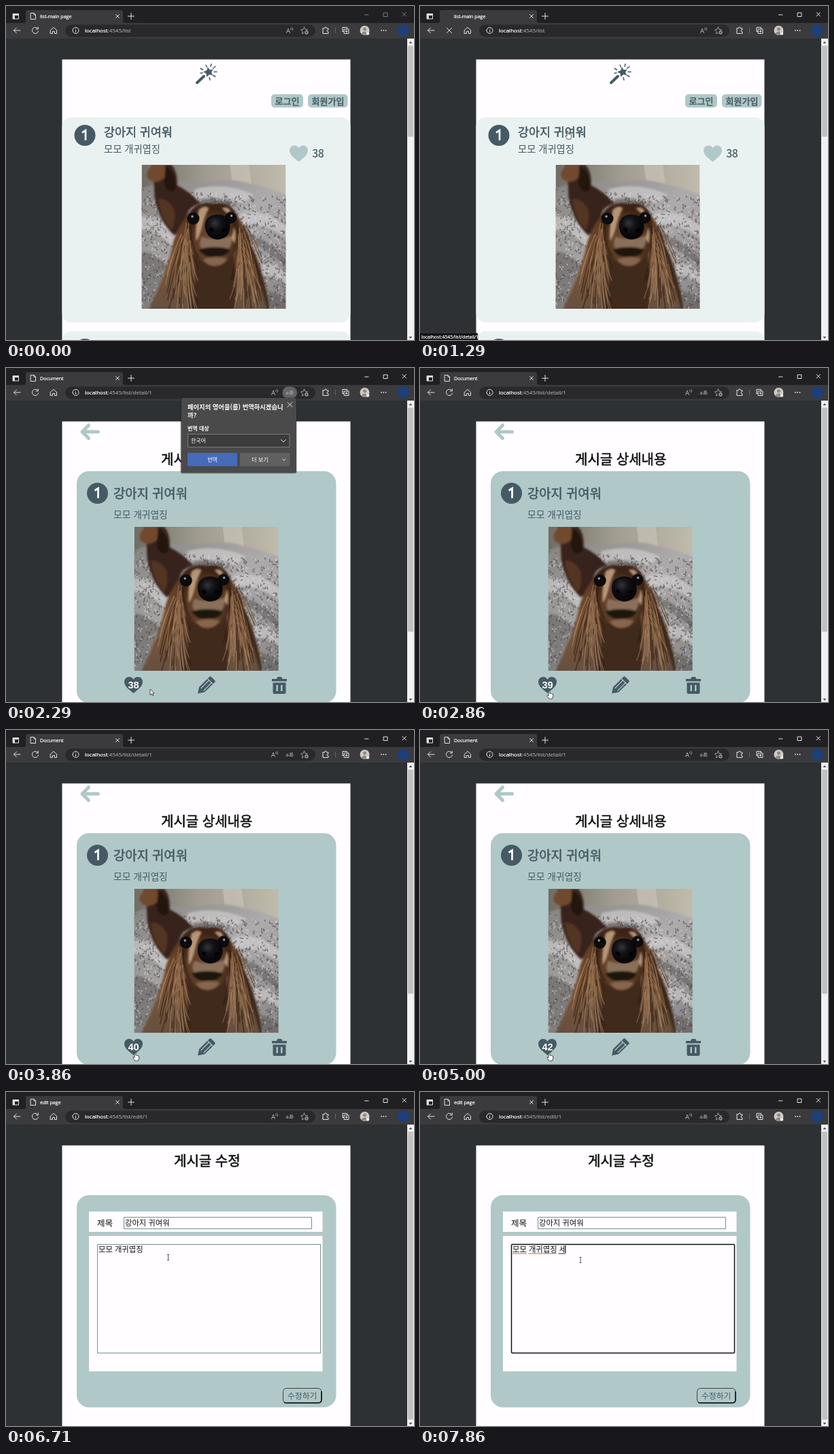
Animation, 600 px wide and 492 px high, one loop 8 s. Source, as an HTML page:

```html
<!DOCTYPE html>
<html lang="ko">
<head>
<meta charset="utf-8">
<title>List demo</title>
<style>
html, body { margin: 0; width: 100%; height: 100%; overflow: hidden; background: #2d3133; }
svg { display: block; }
.stage { width: 600px; height: 492px; }
text { font-family: "Noto Sans CJK KR", "Noto Sans CJK", "Noto Sans CJK JP", sans-serif; white-space: pre; }
.ui { font-family: "Open Sans", "Noto Sans", sans-serif; fill: #fff; stroke: #fff; stroke-width: .22; }
.dim { fill: #b0b0b0; stroke: #b0b0b0; stroke-width: .1; }
.mid { font-weight: 500; stroke: currentColor; stroke-width: .55; }
.num { font-family: "Liberation Sans", sans-serif; font-weight: 700; }
.ink { color: #111; fill: #111; }
.slate { color: #455a64; fill: #455a64; }
.teal { fill: #b0c8c7; }
.white { fill: #fffdff; }
.line { fill: none; stroke: #e4e4e4; stroke-width: 1; stroke-linecap: round; stroke-linejoin: round; }
.soft { stroke: #a0a0a0; }
.c { text-anchor: middle; }
</style>
</head>
<body>
<svg class="stage" viewBox="0 0 600 492">
  <defs>
    <linearGradient id="wall" x2="1"><stop stop-color="#6f6c64"/><stop offset=".45" stop-color="#a09c90"/><stop offset="1" stop-color="#c0bbac"/></linearGradient>
    <linearGradient id="cloth" x2="1" y2="1"><stop stop-color="#84817e"/><stop offset=".5" stop-color="#aeabac"/><stop offset="1" stop-color="#858283"/></linearGradient>
    <linearGradient id="ear" x2="0" y2="1"><stop stop-color="#54331c"/><stop offset=".5" stop-color="#7a5335"/><stop offset="1" stop-color="#665040"/></linearGradient>
    <radialGradient id="face" cy=".6"><stop stop-color="#6b4930"/><stop offset=".6" stop-color="#62402a"/><stop offset="1" stop-color="#3c2415"/></radialGradient>
    <radialGradient id="nose" cx=".4" cy=".35"><stop stop-color="#35343a"/><stop offset=".5" stop-color="#131216"/><stop offset="1" stop-color="#08070a"/></radialGradient>
    <filter id="blur"><feGaussianBlur stdDeviation="1.5"/></filter>
    <clipPath id="square"><path d="M0 0H212V212H0Z"/></clipPath>
    <path id="heart" d="M13.500 24C9 20 0 14.500 0 7.500C0 3 3.200 0 7 0C10 0 12.300 1.500 13.500 4C14.700 1.500 17 0 20 0C23.800 0 27 3 27 7.500C27 14.500 18 20 13.500 24Z"/>

    <g id="photo" clip-path="url(#square)">
      <path fill="url(#wall)" d="M0 0H212V70H0Z"/>
      <path fill="#cbc7ba" opacity=".6" d="M130 0H158L162 34H134Z"/>
      <g filter="url(#blur)">
        <path fill="url(#cloth)" d="M-4 36Q40 18 90 27Q130 18 160 28Q190 34 216 46V216H-4Z"/>
        <path fill="#d6d3d4" opacity=".6" d="M78 36Q120 24 165 44L150 56Q110 42 78 52ZM145 72Q180 62 214 92V108Q180 84 148 88ZM-2 76Q28 74 54 106L44 120Q22 94-2 96ZM170 150Q190 140 214 160V176Q190 158 172 166Z"/>
        <path fill="#5d5a58" opacity=".55" d="M-4 128Q20 126 38 150L14 216H-4ZM150 100Q180 104 214 140V152Q180 120 154 112ZM168 178L214 196V216H184ZM72 56Q100 44 140 56L138 62H74Z"/>
      </g>
      <path id="specks" fill="none" stroke="#454143" stroke-linecap="round" stroke-width="1.700" opacity=".55"/>
      <path id="flecks" fill="none" stroke="#e2dfe0" stroke-linecap="round" stroke-width="1.700" opacity=".5"/>
      <g filter="url(#blur)">
        <path fill="#39231a" d="M14 0H44Q53 10 52 30Q72 40 86 57Q70 60 66 76Q60 94 48 104Q26 84 19 48L18 26Z"/>
        <path fill="#71492f" d="M8 12Q12-2 28-1Q40 2 36 16Q28 26 18 25Q6 22 8 12Z"/>
        <path fill="#22140e" d="M35 2Q52 12 50 36Q40 46 33 28Z"/>
        <path fill="#5b3a26" opacity=".8" d="M24 50Q38 48 48 66Q50 84 44 96Q28 78 24 50Z"/>
        <path fill="#3f2a1d" d="M65 95Q38 150 42 214H188Q180 145 146 92Z"/>
        <path fill="url(#ear)" d="M74 66Q56 86 47 112Q40 150 10 214H72Q83 175 75 130Q70 95 78 72Z"/>
        <path fill="url(#ear)" d="M132 64Q149 84 160 112Q164 146 185 214H136Q142 180 136 135Q136 100 128 76Z"/>
        <path fill="url(#face)" d="M68 74Q78 54 105 57Q132 52 141 76Q144 98 140 122Q132 146 108 150Q84 146 75 124Q66 98 68 74Z"/>
      </g>
      <path id="shade" fill="none" stroke="#2a180f" stroke-width="1.800" opacity=".5"/>
      <path id="fur" fill="none" stroke="#c09a75" stroke-width="1.200" opacity=".5"/>
      <g filter="url(#blur)">
        <path fill="#c9a986" opacity=".85" d="M84 66Q93 58 99 64Q92 76 88 94Q84 108 80 112Q78 94 84 66ZM118 64Q126 60 131 68L126 72ZM136 92Q140 100 137 116L132 108Z"/>
        <path fill="#8a6f5a" d="M88 106Q110 114 133 104Q134 122 123 127Q108 132 92 128Q82 120 88 106Z"/>
        <path fill="#1f130e" d="M84 124Q108 118 130 124Q126 136 108 135Q92 138 84 124Z"/>
        <path fill="#94745a" opacity=".75" d="M90 139Q108 134 126 138Q120 149 108 149Q96 149 90 139Z"/>
      </g>
      <g fill="#0d0b0c"><circle cx="76" cy="79" r="9"/><circle cx="131" cy="78" r="8.500"/></g>
      <g fill="#8fa3b5"><circle cx="74.500" cy="76" r="1.700"/><circle cx="132" cy="75" r="1.700"/></g>
      <path fill="url(#nose)" d="M93 90Q94 73 112 73Q130 74 130 92Q129 109 111 110Q94 108 93 90Z"/>
      <path fill="#000" d="M99 94q5-4 7 3q-4 5-7-3ZM117 97q4-7 8-2q-2 6-8 2Z"/>
    </g>

    <g id="badge"><circle r="15.500" class="slate"/><path d="M-4-4L1-7.200V7.200" fill="none" stroke="#fff" stroke-width="2.700"/></g>
  </defs>

  <rect width="600" height="492" fill="#2d3133"/>
  <rect class="white" x="82.500" y="78.700" width="424" height="414"/>

  <g id="list">
    <g stroke="#455a64" stroke-linecap="round">
      <path d="M281 113L291 103.500" stroke-width="4"/>
      <path d="M294 87L295.500 90M302 85.500L301 89M308 89L304.500 92M310 97H306M308 104L304.500 102M300 109L299 105.500M286 92L289.500 94M286 99L289 98.500" stroke-width="1.500"/>
    </g>
    <path class="slate" d="M297 90L299.500 94L304.500 93.500L302 97.500L304 102L299 101L295 104.500L294.500 99.500L290 97L295 95Z"/>
    <rect class="teal" x="390" y="130" width="47" height="19.500" rx="5"/>
    <rect class="teal" x="444" y="130" width="58.500" height="19.500" rx="5"/>
    <g class="c mid slate" font-size="13"><text x="413.500" y="144.500">로그인</text><text x="473.500" y="144.500">회원가입</text></g>
    <rect x="82.500" y="164" width="424" height="302" rx="14" fill="#e9f2f1"/>
    <rect x="82.500" y="479" width="424" height="302" rx="14" fill="#e9f2f1"/>
    <use href="#badge" x="116" y="190.500"/>
    <use href="#badge" x="116" y="505.500"/>
    <g class="mid slate" font-size="17.400"><text x="144" y="192">강아지 귀여워</text><text x="144" y="507">우리집 강아지</text></g>
    <text x="144" y="216" font-size="14.300" class="slate">모모 개귀엽징</text>
    <use href="#heart" x="417" y="205.500" class="teal"/>
    <text x="450.500" y="222.500" font-size="15.500" class="slate" stroke="#455a64" stroke-width=".3">38</text>
    <use href="#photo" x="199.500" y="234"/>
  </g>

  <g id="detail">
    <path d="M135.500 94H113M121.500 84.500L112 94L121.500 103.500" fill="none" stroke="#b0c8c7" stroke-width="5" stroke-linecap="round" stroke-linejoin="round"/>
    <text class="mid ink" x="228" y="142" font-size="20">게시글 상세내용</text>
    <rect class="teal" x="104" y="152" width="381.500" height="341.500" rx="18"/>
    <use href="#badge" x="134.500" y="184.500"/>
    <text class="mid slate" x="158" y="191.500" font-size="18.800">강아지 귀여워</text>
    <text class="slate" x="158" y="220.500" font-size="13.750">모모 개귀엽징</text>
    <use href="#photo" x="188.700" y="234"/>
    <use href="#heart" x="174" y="455" class="slate"/>
    <text id="likes" class="c num" x="187.500" y="472" font-size="14.500" fill="#fff"></text>
    <g class="slate">
      <path d="M282 479.500L284 470L299 455Q300.500 453.500 302 455L307 460Q308.500 461.500 307 463L292 477.500Z"/>
      <path d="M391 458H398L399.500 455H405L406.500 458H413V461.500H391Z"/>
      <path d="M392.500 463.500H411.500V477.500Q411.500 480 409 480H395Q392.500 480 392.500 477.500Z"/>
    </g>
    <path d="M296.500 458L304 465.500M286.500 472L299 459.500M290.500 475.500L303 463" stroke="#b0c8c7" stroke-width="1.100"/>
    <path d="M398.700 467V476M405.300 467V476" stroke="#b0c8c7" stroke-width="2.400"/>
  </g>

  <g id="edit">
    <text class="mid ink" x="247" y="109" font-size="20">게시글 수정</text>
    <rect class="teal" x="104" y="152" width="381.500" height="312.500" rx="18"/>
    <path class="white" d="M122 176H465.500V206H122ZM122 212H465.500V411.500H122Z"/>
    <text class="ink" x="134" y="197.500" font-size="12.500">제목</text>
    <path fill="none" stroke="#78908f" d="M173.500 184.500H449.500V201.500H173.500Z"/>
    <rect id="area" x="134.500" y="224.500" width="328" height="160" fill="none"/>
    <g class="ink" font-size="11.300"><text x="175" y="197">강아지 귀여워</text><text id="body" x="136" y="236"></text></g>
    <path id="marks" d="M136 238H157M159.500 238H201" stroke="#b56a3a"/>
    <path id="compose" d="M203.500 238H213.500" stroke="#222"/>
    <path id="caret" stroke="#111"/>
    <rect x="407.500" y="436.500" width="56.500" height="21.500" rx="5" class="teal" stroke="#3c4244"/>
    <path d="M409 457.200Q410 458 412 458H459Q464 458 464 453V441" fill="none" stroke="#111" stroke-width="1.600"/>
    <text class="c slate" x="435.700" y="451.500" font-size="11.800">수정하기</text>
  </g>

  <g id="browser">
    <path fill="#202022" d="M0 0H600V26H0Z"/>
    <path fill="#3b3a3c" d="M0 25H600V48H0ZM26 25Q29 25 29 22V9Q29 6 32 6H169Q172 6 172 9V22Q172 25 175 25Z"/>
    <rect x="87" y="27.500" width="368" height="18" rx="9" fill="#29292b"/>
    <path class="line" d="M10.500 11.500H18.500V19H10.500ZM161.500 12.500L166.500 17.500M166.500 12.500L161.500 17.500M184 10.500V19.500M179.500 15H188.500"/>
    <path fill="#dedede" d="M10 11H19V14H10ZM10 11H13V19H10Z"/>
    <path id="doc" class="line" d="M36.500 10.500H41L43.500 13V19.500H36.500ZM41 10.500V13H43.500"/>
    <path id="buttons" class="line" d="M527.500 13H533M555.500 10H561V15.500H555.500ZM583 9.500L588.500 15M588.500 9.500L583 15"/>
    <text id="tab" class="ui" x="50" y="17.700" font-size="7.100"></text>
    <path class="line" d="M21 36H11.500M15.500 32L11.500 36L15.500 40"/>
    <path id="reload" class="line" d="M47 33.500A4.600 4.600 0 1 0 47.600 37M47.300 31V34H44.300"/>
    <path id="stop" class="line" d="M39.500 32.500L46.500 39.500M46.500 32.500L39.500 39.500"/>
    <path class="line" d="M65.500 35.500L70 31.500L74.500 35.500V40.500H71.500V37.500H68.500V40.500H65.500Z"/>
    <path class="line" d="M98 36a4.500 4.500 0 1 0 9 0a4.500 4.500 0 1 0-9 0M102.500 35.800V38.500M102.500 33.700V33.800"/>
    <text class="ui" x="116" y="39" font-size="8">localhost<tspan id="url" class="dim"></tspan></text>
    <g id="read"><text class="ui dim" x="-5" y="39.500" font-size="9.500">A</text><path class="line soft" stroke-width=".8" d="M1.500 32.500Q3 33.500 2 35M3.500 31.500Q6 33.500 4 36"/></g>
    <rect id="hot" x="406.500" y="27.500" width="21.500" height="17.500" rx="8.500" fill="#646466"/>
    <text id="lang" class="ui dim" x="411.500" y="38.800" font-size="7.500">aあ</text>
    <path class="line soft" d="M438.500 31L440 34.500L443.500 35L441 37M438.500 31L437 34.500L433.500 35L436 37.500L435.500 41L438 39.500"/>
    <circle cx="442" cy="39" r="2.700" fill="#a0a0a0"/><path d="M442 37.500V40.500M440.500 39H443.500" stroke="#29292b" stroke-width=".8"/>
    <path class="line" d="M466 33H468.500Q468.500 31 470 31Q471.500 31 471.500 33H474V35Q472 35 472 36.500Q472 38 474 38V40.500H466V38M466 33V38"/>
    <path d="M484.500 32V40" stroke="#666"/>
    <path class="line" d="M495 37.500V31.500H501.500V33.500M495 37.500H497M497.500 34H504V40.500H497.500ZM500.700 35.800V38.800M499.200 37.300H502.200"/>
    <circle cx="527.500" cy="36" r="7" fill="#cfcac5"/>
    <circle cx="527.500" cy="34" r="2.500" fill="#8e8985"/><path d="M522.500 40.500Q527.500 34.500 532.500 40.500Q527.500 45 522.500 40.500Z" fill="#8e8985"/>
    <circle cx="532" cy="40.500" r="2.300" fill="#eee"/>
    <g fill="#dedede"><circle cx="552" cy="36" r=".9"/><circle cx="555.300" cy="36" r=".9"/><circle cx="558.600" cy="36" r=".9"/></g>
    <circle cx="584" cy="36" r="9" fill="#1f3f78"/>
    <path fill="#f1f1f1" d="M590 48H600V492H590Z"/>
    <rect id="thumb" x="591" y="58.500" width="8" fill="#c1c1c1"/>
    <path fill="#555" d="M592.500 55L595 52L597.500 55ZM592.500 487L595 490L597.500 487Z"/>
  </g>

  <g id="popup">
    <rect x="256.500" y="43.500" width="171" height="112" rx="3" fill="#000" opacity=".35"/>
    <rect x="257.500" y="44" width="169.500" height="110.500" rx="2.500" fill="#4a4a4b"/>
    <g fill="#fff" font-size="8">
      <g font-weight="700"><text x="267" y="60.500" font-size="9.300">페이지의 영어을(를) 번역하시겠습니</text><text x="267" y="72.500" font-size="9.300">까?</text><text x="267" y="91.500">번역 대상</text></g>
      <path fill="#3c3c3d" stroke="#7b7b7b" d="M267.500 97.500H417V116.500H267.500Z"/>
      <path fill="#456bb9" d="M267 125H340V144.500H267Z"/>
      <path fill="#606061" d="M344 125H417.500V144.500H344Z"/>
      <text x="272" y="109.700">한국어</text><text class="c" x="303.500" y="137.500">번역</text><text class="c" x="373.500" y="137.500">더 보기</text>
    </g>
    <path class="line" d="M414 50.500L421 57.500M421 50.500L414 57.500M404.500 105.500L408 109L411.500 105.500M406.500 134L408.800 136.300L411 134"/>
  </g>

  <g id="status"><path d="M-1 481.500H82.500Q85 481.500 85 484V493H-1Z" fill="#141416" stroke="#4a4a4c" stroke-width=".6"/><text id="link" class="ui" x="2" y="489.800" font-size="6.850"></text></g>

  <g id="cursor">
    <path id="arrow" d="M0 0V8.500L2 6.800L3.400 9.800L4.900 9.100L3.500 6.200H6Z" fill="#fff" stroke="#111" stroke-width=".7"/>
    <path id="hand" d="M-.9 .8Q0-.6 .9 .8V4.400Q1.800 3.700 2.600 4.600Q3.500 4 4.200 5Q5.500 4.600 5.600 6V9L4.500 12.200H-.3L-3 8.200Q-3.300 6.600-1.800 7L-.9 7.800Z" fill="#fff" stroke="#111" stroke-width=".7"/>
    <path id="beam" d="M-1.500-4H1.500M0-4V4M-1.500 4H1.500" stroke="#444" stroke-width=".9"/>
  </g>
</svg>
<script>
const $ = id => document.getElementById(id);
const LOOP = 8000, STEP = 1000 / 7;

// Each row changes part of the state from its time on.
const scenes = [
  [0, { page: 'list', tab: 'list-main page', url: '/list', likes: 38, body: '모모 개귀엽징', focus: false, cursor: '', link: '', popup: false, loading: false, lang: false, caret: 0 }],
  [140, { focus: true }],
  [430, { cursor: 'arrow' }],
  [860, { cursor: 'hand', link: '/list/detail/1' }],
  [1290, { loading: true }],
  [1430, { page: 'detail', link: '' }],
  [1570, { tab: 'Document', url: '/list/detail/1', loading: false, lang: true, cursor: 'arrow' }],
  [1860, { popup: true }],
  [2570, { cursor: 'hand' }],
  [2710, { popup: false }],
  [2860, { likes: 39 }],
  [3570, { likes: 40 }],
  [4140, { likes: 41 }],
  [4570, { likes: 42 }],
  [5290, { cursor: 'arrow' }],
  [5710, { cursor: 'hand', link: '/list/edit/1' }],
  [6290, { loading: true }],
  [6430, { page: 'edit', tab: 'edit page', url: '/list/edit/1', link: '', loading: false, cursor: 'arrow' }],
  [6570, { cursor: 'beam' }],
  [7000, { caret: 201.5 }],
  [7430, { body: '모모 개귀엽징 ', caret: 203.5 }],
  [7570, { body: '모모 개귀엽징 ㅅ', caret: 213.8 }],
  [7710, { body: '모모 개귀엽징 세' }]
];

const path = [
  [430, 310, 300], [1000, 217, 184], [1430, 217, 184], [2290, 212, 473], [2570, 190, 475],
  [5000, 190, 475], [5860, 302, 478], [6290, 302, 478], [6710, 238.5, 243.5],
  [7000, 238.5, 243.5], [7430, 236, 247.5]
];

const thumbs = { list: 134, detail: 330, edit: 424 };
const ease = p => p * p * (3 - 2 * p);
const show = (id, on) => { $(id).style.display = on ? '' : 'none'; };
const set = (id, attrs) => { for (const k in attrs) $(id).setAttribute(k, attrs[k]); };

function pointAt(t) {
  const i = path.findIndex(p => p[0] > t);
  if (i < 0) return path[path.length - 1].slice(1);
  if (i === 0) return path[0].slice(1);
  const [a, ax, ay] = path[i - 1], [b, bx, by] = path[i];
  const p = ease((t - a) / (b - a));
  return [ax + (bx - ax) * p, ay + (by - ay) * p];
}

function draw(t) {
  const now = Math.floor((t + 5) / STEP) * STEP + 5;
  const s = Object.assign({}, ...scenes.filter(r => r[0] <= now).map(r => r[1]));
  for (const id of ['list', 'detail', 'edit']) show(id, s.page === id);
  for (const id of ['arrow', 'hand', 'beam']) show(id, s.cursor === id);
  const [x, y] = pointAt(now);
  set('cursor', { transform: `translate(${x} ${y})` });

  $('tab').textContent = s.tab;
  $('url').textContent = ':4545' + s.url;
  $('likes').textContent = s.likes;
  $('body').textContent = s.body;
  $('link').textContent = 'localhost:4545' + s.link;
  show('status', s.link);
  show('popup', s.popup);
  show('hot', s.popup);
  show('lang', s.lang);
  show('stop', s.loading);
  show('reload', !s.loading);
  show('doc', s.tab !== 'list-main page' || !s.loading);
  set('read', { transform: `translate(${s.lang ? 395 : 417} 0)` });
  set('buttons', { opacity: s.focus ? 1 : .45 });
  set('thumb', { height: thumbs[s.page] });

  const composing = s.body.length > 8;
  set('area', { stroke: s.caret ? '#111' : '#78908f', 'stroke-width': s.caret ? 1.5 : 1, rx: s.caret ? 1.5 : 0 });
  set('caret', { d: `M${s.caret} 226V237.5` });
  show('caret', s.caret);
  show('marks', composing);
  show('compose', composing);
}

function seeded(seed) {
  return () => (seed = seed * 16807 % 2147483647) / 2147483647;
}

function dots(rnd, count) {
  let d = '';
  for (let i = 0; i < count; i++) {
    const x = rnd() * 212, y = 36 + x * .05 + rnd() * 172;
    d += `M${x.toFixed(1)} ${y.toFixed(1)}l${(rnd() * 4 - 2).toFixed(1)} ${(rnd() * 3).toFixed(1)}`;
  }
  return d;
}

// Strands fall from the head, spreading outwards on both sides.
function strands(rnd, count) {
  let d = '';
  for (let i = 0; i < count; i++) {
    const side = i % 2 ? 1 : -1, k = rnd();
    const x = 106 + side * (34 + k * 14), y = 85 + rnd() * 70;
    d += `M${x} ${y}q${side * 14 * k} ${20 + rnd() * 15} ${side * (k * 36 - 12)} ${45 + rnd() * 35}`;
  }
  return d;
}

const rnd = seeded(41);
set('specks', { d: dots(rnd, 900) });
set('flecks', { d: dots(rnd, 500) });
set('shade', { d: strands(rnd, 50) });
set('fur', { d: strands(rnd, 60) });

const start = performance.now();
function tick() {
  draw((performance.now() - start) % LOOP);
  requestAnimationFrame(tick);
}
tick();
</script>
</body>
</html>
```
